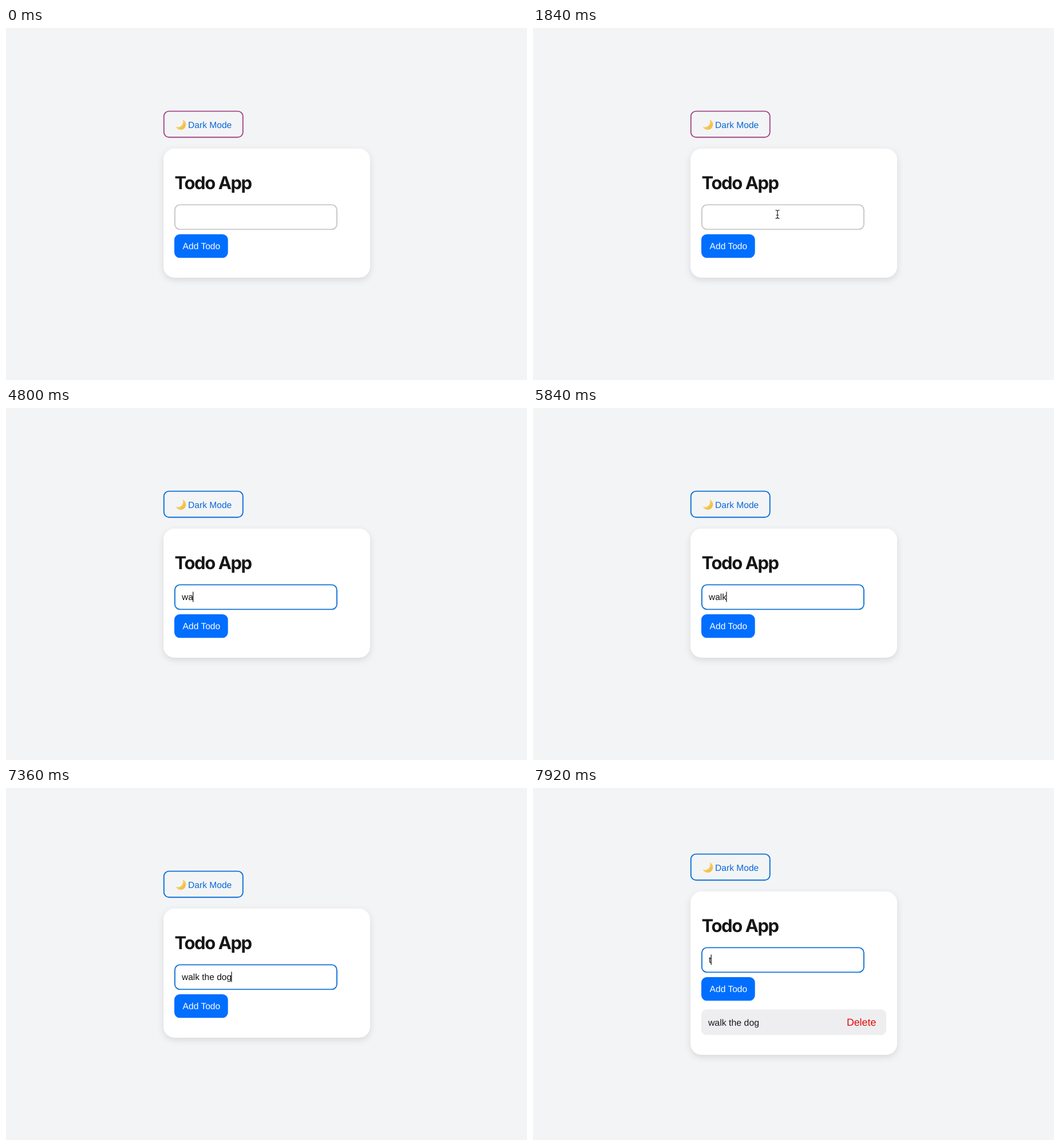
These frames come from a looping animation (910x616 px, 8000 ms). An HTML page:

```html
<!DOCTYPE html>
<html lang="en">
<head>
<meta charset="utf-8">
<title>Todo App</title>
<style>
  html, body { margin: 0; width: 100%; height: 100%; overflow: hidden; background: #f3f4f6; }
  svg { display: block; width: 910px; height: 616px; }
  text { font: 15.6px "Liberation Sans", Arial, sans-serif; text-rendering: geometricPrecision; white-space: pre; }
  h1, .title { font: 700 31px Inter, sans-serif; letter-spacing: -.045em; fill: #161618; }
  .card { fill: #fff; filter: drop-shadow(0 4px 6px rgba(0, 0, 0, .11)); }
  .toggle, .field { stroke-width: 1.9; }
  .toggle { fill: none; }
  .field { fill: #fff; }

  /* 1% of the loop is 80 ms */
  .app, .toggle, .field, .empty, .added, .pointer, .arrow, .beam { animation: 8s linear infinite; }
  .app { animation-name: lift; animation-timing-function: step-end; }
  .empty { animation-name: leave; animation-timing-function: step-end; }
  .added { animation-name: enter; animation-timing-function: step-end; }
  .toggle { animation-name: toggle; }
  .field { animation-name: focus; }
  .pointer { animation-name: move; animation-timing-function: step-end; }
  .arrow { animation-name: arrow; animation-timing-function: step-end; }
  .beam { animation-name: beam; animation-timing-function: step-end; }

  @keyframes lift { 0% { transform: none } 93%, to { transform: translateY(-30px) } }
  @keyframes leave { 0% { visibility: visible } 93%, to { visibility: hidden } }
  @keyframes enter { 0% { visibility: hidden } 93%, to { visibility: visible } }
  @keyframes toggle { 0%, 24% { stroke: #a34a86 } 28%, to { stroke: #0c70d8 } }
  @keyframes focus { 0%, 24% { stroke: #c6c6c8 } 26%, to { stroke: #1272d6 } }
  @keyframes arrow { 0% { visibility: hidden } 12% { visibility: visible } 15%, to { visibility: hidden } }
  @keyframes beam { 0% { visibility: hidden } 15% { visibility: visible } 40%, to { visibility: hidden } }
  @keyframes move {
    0%, 12% { transform: translate(110px, 396px) }
    13% { transform: translate(178px, 380px) }
    14% { transform: translate(258px, 357px) }
    15% { transform: translate(335px, 338px) }
    16% { transform: translate(392px, 329px) }
    17% { transform: translate(422px, 326px) }
    19% { transform: translate(425px, 326px) }
    21% { transform: translate(427px, 326px) }
    24%, to { transform: translate(429px, 331px) }
  }
</style>
</head>
<body>
<svg viewBox="0 0 910 616">
  <defs>
    <linearGradient id="gold" x1="0" y1="0" x2="1" y2="1">
      <stop offset="0" stop-color="#ffe27a"/>
      <stop offset="1" stop-color="#eeb63a"/>
    </linearGradient>
  </defs>
  <g class="app">
    <rect class="toggle" x="275.8" y="145.6" width="138" height="45.6" rx="9"/>
    <path d="M308.5 160.2A9.3 9.3 0 1 1 296.6 172.8C304 176 312 168.500 308.500 160.200Z" fill="url(#gold)"/>
    <text x="318" y="174.500" fill="#0868d8">Dark Mode</text>

    <rect class="card empty" x="275" y="211" width="361" height="226" rx="19.500"/>
    <rect class="card added" x="275" y="211" width="361" height="286" rx="19.500"/>
    <text class="title" x="294.500" y="281.800">Todo App</text>

    <rect class="field" x="294.900" y="309.400" width="283" height="43" rx="9"/>
    <text id="typed" x="307" y="335.800" fill="#111" style="font-size:15.5px"></text>
    <rect id="caret" y="321.500" width="1.200" height="18" fill="#111"/>

    <rect x="294" y="361" width="93.700" height="41.300" rx="9.500" fill="#006eff"/>
    <text x="308.600" y="386.600" fill="#fff">Add Todo</text>

    <g class="added">
      <rect x="294" y="417.500" width="323" height="44.800" rx="9" fill="#eeeef0"/>
      <text x="305.900" y="445.600" fill="#1a1a1c" style="font-size:15.9px">walk the dog</text>
      <text x="547.900" y="445.600" fill="#e00a0a" style="font-size:17.800px">Delete</text>
    </g>
  </g>
  <g class="pointer">
    <path class="arrow" d="M0 0V15.500L3.600 12.200L6 17.700L8.500 16.600L6.100 11.300H11Z" fill="#000" stroke="#fff"/>
    <g class="beam" fill="none" stroke-linecap="round">
      <path id="bar" d="M-3 -7.200Q0 -7.200 0 -5V5Q0 7.200 -3 7.200M3 -7.200Q0 -7.200 0 -5V5Q0 7.200 3 7.200M-1.700 1.500H1.700" stroke="#fff" stroke-width="2.600"/>
      <use href="#bar" style="stroke:#222"/>
      <path d="M-3 -7.200Q0 -7.200 0 -5V5Q0 7.200 -3 7.200M3 -7.200Q0 -7.200 0 -5V5Q0 7.200 3 7.200M-1.700 1.500H1.700" stroke="#222" stroke-width="1.200"/>
    </g>
  </g>
</svg>
<script>
  const LOOP = 8000, FOCUS = 1920, ENTER = 7440, NEXT = 7880, BLINK = 500;
  const phrase = "walk the dog";
  const keys = [3180, 4560, 5040, 5440, 5920, 6040, 6160, 6280, 6400, 6520, 6720, 6960];
  const typed = document.getElementById("typed");
  const caret = document.getElementById("caret");
  const strokes = [FOCUS, ...keys, ENTER, NEXT];

  function valueAt(t) {
    if (t >= ENTER) return t >= NEXT ? "t" : "";
    return phrase.slice(0, keys.filter(k => k <= t).length);
  }

  function draw(t) {
    const value = valueAt(t);
    if (typed.textContent !== value) typed.textContent = value;
    const last = strokes.filter(k => k <= t).pop();
    const on = last !== undefined && Math.floor((t - last) / BLINK) % 2 === 0;
    caret.style.visibility = on ? "visible" : "hidden";
    caret.setAttribute("x", 306.8 + (value ? typed.getComputedTextLength() - 0.5 : 0));
  }

  let start;
  function tick(now) {
    start ??= now;
    draw((now - start) % LOOP);
    requestAnimationFrame(tick);
  }
  requestAnimationFrame(tick);
</script>
</body>
</html>
```
